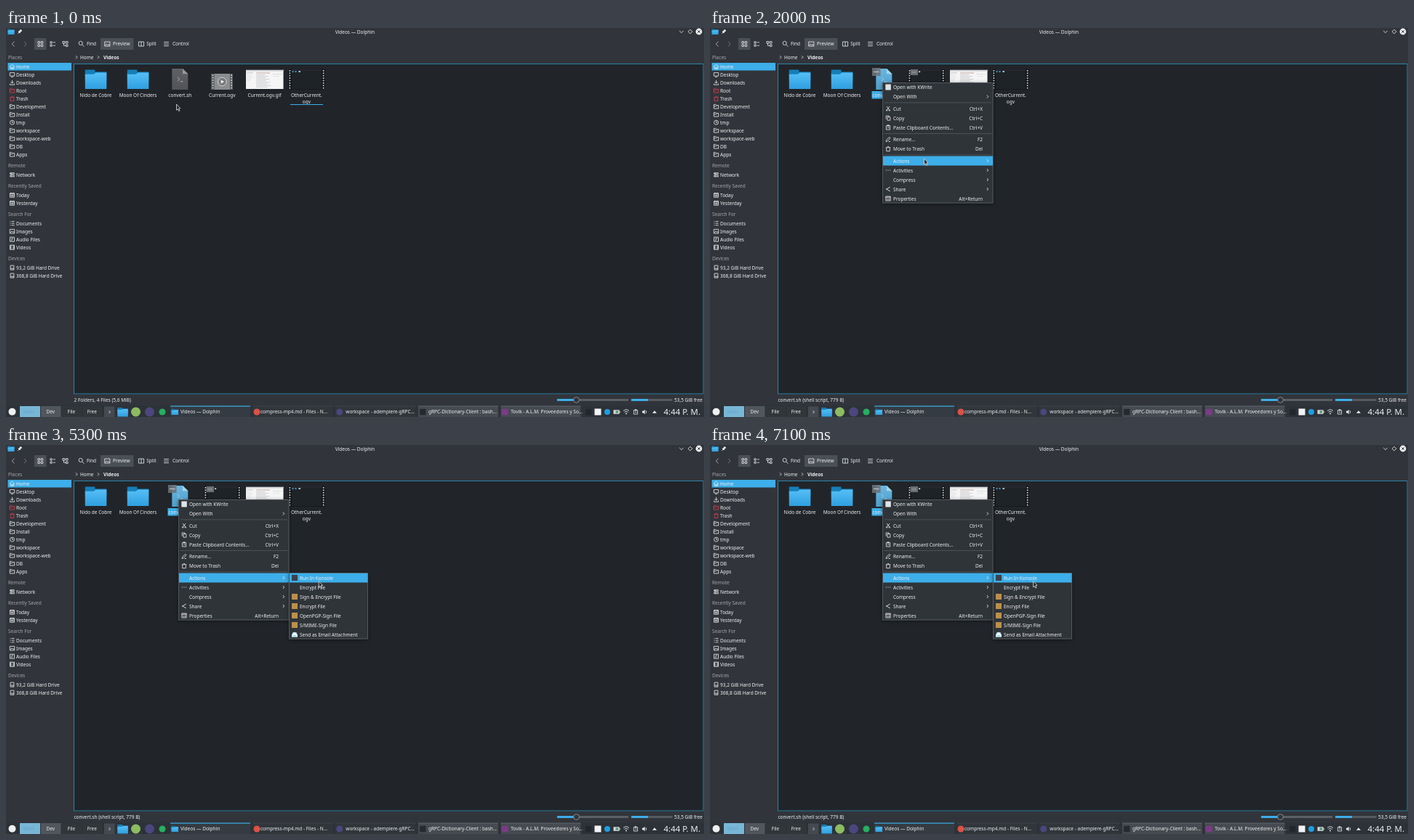
Write an HTML page with a canvas that moves like this. It is 960x536 px and loops after 8 s.

```html
<!DOCTYPE html>
<html lang="en">
<head>
<meta charset="utf-8">
<title>File manager</title>
<style>
html, body { margin: 0; width: 100%; height: 100%; overflow: hidden; background: #31363b; }
canvas { display: block; width: 960px; height: 536px; }
</style>
</head>
<body>
<canvas id="stage"></canvas>
<script>
const W = 960, H = 536, LOOP = 8000, STEP = 100;
const canvas = document.getElementById('stage');
const ctx = canvas.getContext('2d');
const dpr = window.devicePixelRatio || 1;
canvas.width = W * dpr;
canvas.height = H * dpr;

const PANEL = '#31353b', VIEW = '#212529', TEXT = '#eff0f1', DIM = '#a3a7ab', BLUE = '#3daee9', RED = '#da4453';

const ICONS = {
  folder: 'M-3.2 2.8V-2.8H-.6L.4-1.7H3.2V2.8ZM-3.2-.4H0L1-1.6',
  home: 'M-3.4 .2L0-3.2L3.4 .2M-2.4-.6V3H2.4V-.6M-.6 3V1H.8V3',
  desktop: 'M-3.2-2.6H3.2V1.8H-3.2ZM-1.6 3.2H1.6',
  download: 'M0-3.3V1M-2-1L0 1L2-1M-3 1.4V3H3V1.4',
  trash: 'M-2.3-1.8V3.2H2.3V-1.8M-3.2-1.8H3.2M-1-3H1',
  clock: 'M-3 0a3 3 0 1 0 6 0a3 3 0 1 0-6 0M0-2V.2H1.8',
  network: 'M-2.8-2.6H2.8V-.8H-2.8ZM-2.8 .8H2.8V2.6H-2.8ZM-2-1.6H0M-2 1.7H0',
  calendar: 'M-3-2.6H3V3H-3ZM-3-1.4H3M-1.8 .2H2M-1.8 1.6H2M-1.6-3.4V-2.6M1.6-3.4V-2.6',
  docs: 'M-3-2.6H-2M-.8-2.6H3M-3 0H-2M-.8 0H3M-3 2.6H-2M-.8 2.6H3',
  image: 'M-3.2-2.8H3.2V2.8H-3.2ZM-2.4 2L-.6-.4L.8 1.2L1.8 .2L2.8 2',
  audio: 'M-3-3H3V3H-3ZM-.4 1.6V-1.6L1.4-1M-1.6 1.6H-.4',
  video: 'M-3-3H3V3H-3ZM-1.6-3V3M1.6-3V3M-3 0H-1.6M1.6 0H3',
  drive: 'M-2.4-3H2.4V3H-2.4ZM-2.4 1H2.4M.6 2H1.4',
  left: 'M1.6-3.4L-1.8 0L1.6 3.4',
  right: 'M-1.5-3L1.5 0L-1.5 3',
  arrow: 'M-1-2L1 0L-1 2',
  down: 'M-2.8-1.2L0 1.6L2.8-1.2',
  diamond: 'M0-2.9L2.9 0L0 2.9L-2.9 0Z',
  cross: 'M-1.7-1.7L1.7 1.7M1.7-1.7L-1.7 1.7',
  grid: 'M-3.4-3.4H-.9V-.9H-3.4ZM.9-3.4H3.4V-.9H.9ZM-3.4 .9H-.9V3.4H-3.4ZM.9 .9H3.4V3.4H.9Z',
  list: 'M-3.4-3.2H-1V-1H-3.4ZM-3.4 1H-1V3.2H-3.4ZM.6-2.2H3.6M.6 2.2H3.6',
  tree: 'M-3.6-3.4H-.6V-1H-3.6ZM.8 1H3.6V3.4H.8ZM.8-3.4H3.6V-1H.8ZM-2-1V2.2H.8',
  find: 'M-3.4-.8a2.6 2.6 0 1 0 5.2 0a2.6 2.6 0 1 0-5.2 0M1.2 1.2L4 4',
  preview: 'M-3.6-3H3.6V3H-3.6ZM-3 2.4L-1-.2L.6 1.6L1.8 .4L3 2.4',
  split: 'M-3.6-3H3.6V3H-3.6ZM0-3V3',
  menu: 'M-3.4-2.6H3.4M-3.4 0H3.4M-3.4 2.6H3.4',
  cut: 'M-2-3L1.4 1.6M2-3L-1.4 1.6M-2.6 2.4a.8.8 0 1 0 1.6 0a.8.8 0 1 0-1.6 0M1 2.4a.8.8 0 1 0 1.6 0a.8.8 0 1 0-1.6 0',
  copy: 'M-2.8 1.6V-3H1V-1.6M-1-1.4H2.8V3.2H-1Z',
  paste: 'M-2.6-2.4H2.6V3H-2.6ZM-1-3.2H1V-2H-1ZM-1 .2H1.4',
  rename: 'M-3 3L-2.4 .8L1.6-3.2L3-1.8L-1 2.4ZM.6 3H3',
  dots: 'M-3.2 0H-2M-.6 0H.6M2 0H3.2',
  share: 'M-2.4 0L2-2.4M-2.4 0L2 2.4M-3 0H-1.8M1.4-2.6H2.6M1.4 2.6H2.6',
  props: 'M-3.2-3H3.2V3H-3.2ZM-3.2-1.8H3.2M-2 0H-.6M.4 0H2.2M-2 1.6H-.6M.4 1.6H2.2'
};
for (const name in ICONS) ICONS[name] = new Path2D(ICONS[name]);

const PLACES = [
  [53, 'Home', 'home'], [64, 'Desktop', 'desktop'], [75, 'Downloads', 'download'],
  [86, 'Root', 'folder', RED], [97, 'Trash', 'trash', RED], [108, 'Development', 'folder'],
  [119, 'Install', 'folder'], [130, 'tmp', 'clock'], [141, 'workspace', 'folder'],
  [152, 'workspace-web', 'folder'], [163, 'DB', 'folder'], [174, 'Apps', 'folder'],
  [202, 'Network', 'network'], [230, 'Today', 'calendar'], [241, 'Yesterday', 'calendar'],
  [269, 'Documents', 'docs'], [280, 'Images', 'image'], [291, 'Audio Files', 'audio'],
  [302, 'Videos', 'video'], [330, '93,2 GiB Hard Drive', 'drive'], [341, '368,8 GiB Hard Drive', 'drive']
];
const HEADINGS = [[40, 'Places'], [189, 'Remote'], [217, 'Recently Saved'], [256, 'Search For'], [317, 'Devices']];

// Label, centre line, icon, shortcut ('>' opens a submenu)
const MENU = [
  ['Open with KWrite', 81.5, 'square'], ['Open With', 94.5, '', '>'],
  ['Cut', 111, 'cut', 'Ctrl+X'], ['Copy', 124, 'copy', 'Ctrl+C'],
  ['Paste Clipboard Contents...', 137, 'paste', 'Ctrl+V'],
  ['Rename...', 153.5, 'rename', 'F2'], ['Move to Trash', 166.5, 'trash', 'Del'],
  ['Actions', 183, '', '>'], ['Activities', 196, 'dots', '>'], ['Compress', 209, '', '>'],
  ['Share', 222, 'share', '>'], ['Properties', 235, 'props', 'Alt+Return']
];
const ACTIONS = ['Run In Konsole', 'Encrypt File', 'Sign & Encrypt File', 'Encrypt File',
  'OpenPGP-Sign File', 'S/MIME-Sign File', 'Send as Email Attachment'];

// Pointer path: time, x, y
const PATH = [
  [0, 234.5, 105], [700, 238, 75.8], [1700, 238, 75.8], [2000, 294.6, 180],
  [2500, 305, 183], [3000, 305, 183], [3800, 430.6, 187], [5200, 430.6, 187],
  [5300, 430.2, 187.6], [6000, 430.2, 233.6], [6200, 431, 248], [6400, 432, 248],
  [7000, 443, 188.5], [7100, 444.6, 187.6]
];

function pointerAt(t) {
  const i = PATH.findIndex(p => p[0] > t);
  if (i < 0) return PATH[PATH.length - 1].slice(1);
  const a = PATH[i - 1], b = PATH[i];
  const k = (t - a[0]) / (b[0] - a[0]);
  return [a[1] + (b[1] - a[1]) * k, a[2] + (b[2] - a[2]) * k];
}

function rect(x, y, w, h, fill) {
  ctx.fillStyle = fill;
  ctx.fillRect(x, y, w, h);
}

function frame(x, y, w, h, color) {
  ctx.strokeStyle = color;
  ctx.lineWidth = 1;
  ctx.strokeRect(x + .5, y + .5, w - 1, h - 1);
}

function disc(x, y, r, fill, edge) {
  ctx.beginPath();
  ctx.arc(x, y, r, 0, Math.PI * 2);
  ctx.fillStyle = fill;
  ctx.fill();
  if (edge) {
    ctx.strokeStyle = edge;
    ctx.lineWidth = .8;
    ctx.stroke();
  }
}

function shape(d, x, y, fill, edge, width = .8) {
  ctx.save();
  ctx.translate(x, y);
  const path = typeof d === 'string' ? new Path2D(d) : d;
  if (fill) { ctx.fillStyle = fill; ctx.fill(path); }
  if (edge) { ctx.strokeStyle = edge; ctx.lineWidth = width; ctx.stroke(path); }
  ctx.restore();
}

const icon = (name, x, y, color = TEXT, width = .8) => shape(ICONS[name], x, y, null, color, width);

// y is the middle of the capitals; type is set at double size and halved
function text(str, x, y, { color = TEXT, align = 'left', size = 6.5, weight = 400 } = {}) {
  ctx.save();
  ctx.translate(x, y + size * .36);
  ctx.scale(.5, .5);
  ctx.font = `${weight} ${size * 2}px "Noto Sans", sans-serif`;
  ctx.textAlign = align;
  ctx.fillStyle = color;
  ctx.fillText(str, 0, 0);
  ctx.restore();
}

function folder(x, y, w, h) {
  const g = ctx.createLinearGradient(0, y, 0, y + h);
  g.addColorStop(0, '#5cc4fa');
  g.addColorStop(1, '#2f9fe0');
  rect(x, y, w * .46, h * .3, '#157fb9');
  rect(x, y + h * .11, w, h * .5, '#157fb9');
  ctx.beginPath();
  ctx.moveTo(x, y + h * .24);
  ctx.lineTo(x + w * .4, y + h * .24);
  ctx.lineTo(x + w * .5, y + h * .15);
  ctx.lineTo(x + w, y + h * .15);
  ctx.lineTo(x + w, y + h);
  ctx.lineTo(x, y + h);
  ctx.fillStyle = g;
  ctx.fill();
}

function filmThumb(x, marks) {
  rect(x, 57, 50, 27.5, '#0d0f11');
  rect(x + 4, 57.5, 42, 26.5, '#1e2328');
  rect(x + 4, 57.5, 42, 1, '#30353a');
  for (let y = 58; y < 84; y += 3.4) {
    rect(x + 1, y, 1.7, 1.8, '#d4d6d8');
    rect(x + 47.3, y, 1.7, 1.8, '#d4d6d8');
  }
  marks(x);
}

function videoIcon() {
  rect(282.5, 63, 29.5, 22, '#8b8d8f');
  rect(282.5, 63, 4, 22, '#55585b');
  rect(308, 63, 4, 22, '#55585b');
  for (let y = 64.2; y < 84; y += 3.5) {
    rect(283.6, y, 1.8, 1.7, '#d0d2d3');
    rect(309.2, y, 1.8, 1.7, '#d0d2d3');
  }
  disc(297.3, 74, 5.8, '#77797b', '#e6e7e8');
  shape('M-1.6-2.6L2.8 0L-1.6 2.6Z', 297.3, 74, '#f0f0f0');
}

function pageThumb() {
  rect(330, 57, 51.5, 27, '#f5f5f5');
  rect(330, 57, 51.5, 1.3, '#55585b');
  rect(330, 58.3, 51.5, 1.8, '#dcdfe2');
  rect(331, 61.5, 9, .8, '#b8bcc0');
  rect(344, 61.5, 19, 1, '#c3a7a3');
  for (let i = 0; i < 9; i++) {
    rect(344, 64 + i * 2.1, 12 + i * 5 % 9, .8, '#bfc3c7');
    if (i < 5) rect(331, 64 + i * 2.1, 5 + i * 3 % 4, .6, '#d5d8da');
  }
  rect(367, 63, 12, .7, '#cfd3d6');
  rect(367, 66, 9, .7, '#d8dbde');
}

function scriptIcon(hover, selected) {
  const g = ctx.createLinearGradient(0, 56, 0, 85);
  const [top, bottom] = selected ? ['#69b6df', '#4d9fcd'] : hover ? ['#777a7d', '#6a6c70'] : ['#5f6164', '#515357'];
  g.addColorStop(0, top);
  g.addColorStop(1, bottom);
  shape('M228.3 56H243L250.3 63.3V85H228.3Z', 0, 0, g);
  shape('M243 56L250.3 63.3H243Z', 0, 0, selected ? '#a4d5ee' : '#96989a');
  shape('M235-2.4', 0, 0);
  shape('M-3.5-2.7L-1 0L-3.5 2.7M.3 3.3H3.8', 239.5, 70.5, null, selected ? '#b9dff2' : '#c7c9cb', .8);
  if (hover) {
    rect(223, 55, 11.5, 11, 'rgba(110,116,122,.88)');
    rect(225, 60, 7.5, 1, '#c9ccce');
    if (!selected) rect(228.2, 56.8, 1, 7.5, '#c9ccce');
  }
}

function drawChrome() {
  rect(0, 0, W, H, PANEL);
  folder(2.5, 1.5, 9, 7.5);
  shape('M1-3L3-1L1.4-.4L0 2L-2 0L.4-1.4ZM-1 1L-3 3', 19, 5, TEXT, TEXT, .7);
  text('Videos — Dolphin', 479.8, 5.2, { align: 'center' });
  icon('down', 929, 5);
  icon('diamond', 941, 5);
  disc(953, 5, 4.4, TEXT);
  icon('cross', 953, 5, PANEL, 1);

  icon('left', 10, 22, '#a7abaf', 1);
  shape(ICONS.right, 26.5, 22, null, '#6d7277', 1);
  rect(39, 14, 16.5, 16, '#4b5056');
  icon('grid', 47.3, 22);
  icon('list', 64.3, 22);
  icon('tree', 81.5, 22);
  icon('find', 103.5, 21.7);
  text('Find', 111, 22);
  rect(130, 14, 45.5, 16, '#4b5056');
  icon('preview', 139.3, 22);
  text('Preview', 147, 22);
  icon('split', 186, 22);
  text('Split', 193.3, 22);
  icon('menu', 220.5, 22);
  text('Control', 229, 22);

  icon('arrow', 97, 40.3);
  text('Home', 102, 40.3);
  icon('arrow', 127, 40.3);
  text('Videos', 134, 40.3, { weight: 700 });

  rect(2.5, 48, 87.5, 10.5, BLUE);
  for (const [y, label] of HEADINGS) text(label, 3, y + .2, { color: DIM });
  for (const [y, label, name, color] of PLACES) {
    icon(name, 8.5, y + .2, color);
    text(label, 14, y + .2);
  }
}

function drawStatus(label) {
  text(label, 93.5, 512.5);
  rect(758, 511, 98, 3, '#5b6065');
  rect(758, 511, 26, 3, BLUE);
  disc(784.5, 512.5, 3.9, PANEL, '#9a9ea2');
  rect(860, 511, 56.5, 3, '#565b60');
  rect(860, 511, 23, 3, BLUE);
  text('53,5 GiB free', 958, 512.7, { align: 'right' });
}

function task(x, label, textX, fill, line) {
  rect(x, 521, 110, 15, fill);
  rect(x, 520.5, 110, 1.2, line);
  text(label, textX, 529);
}

function drawTaskbar() {
  rect(0, 520.5, W, 15.5, '#2d3238');
  disc(8.5, 528.7, 5, TEXT);
  rect(19, 521, 28, 15, '#78b6d6');
  text('Main', 31, 529, { color: '#63a5c8', align: 'center' });
  rect(48, 521, 27.5, 15, '#50565c');
  rect(76.5, 521, 27.5, 15, '#31363b');
  rect(105, 521, 27, 15, '#31363b');
  text('Dev', 61.3, 529, { align: 'center' });
  text('File', 90, 529, { align: 'center' });
  text('Free', 118.3, 529, { align: 'center' });
  rect(135, 521.5, 14.5, 14.5, '#444a50');
  icon('arrow', 142.5, 529);
  folder(153.3, 523, 14.5, 12.5);
  disc(178.5, 529, 6.5, '#8dbb62');
  disc(197.5, 529, 6.5, '#4b467f');
  disc(215, 529, 4.5, '#27ae60');

  task(226, 'Videos — Dolphin', 240, '#343b42', BLUE);
  folder(227.5, 525, 9.5, 8);
  task(339.5, 'compress-mp4.md - Files - N...', 350, '#31363b', '#3c4248');
  disc(345, 529, 4.5, '#dd5144');
  task(453, 'workspace - adempiere-gRPC...', 467.3, '#31363b', '#3c4248');
  disc(458.7, 529, 4.5, '#4b467f');
  task(567, 'gRPC-Dictionary-Client : bash...', 581, '#464b51', '#5b6066');
  rect(569, 524.8, 8.5, 8.5, '#252a2f');
  task(680.5, 'Tovik - A.L.M. Proveedores y So...', 694.2, '#464b51', '#5b6066');
  rect(682, 524.8, 8.5, 8.5, '#7a3b86');

  rect(797, 525, 8.5, 8.5, '#22272b');
  rect(809.5, 524.5, 9, 9, '#f2f3f4');
  disc(827, 529, 4, '#1c9fe0');
  rect(835.5, 526.3, 8, 5.5, '#d9dbdd');
  rect(843.5, 527.8, 1.2, 2.5, '#d9dbdd');
  rect(838.5, 527.4, 3.5, 3.2, '#4c9b62');
  shape('M-4-1.5Q0-5 4-1.5M-2.6 .4Q0-2 2.6 .4M-1 2.4L0 3.2L1 2.4L0 1.6Z', 853, 529, null, TEXT);
  icon('paste', 866, 529);
  shape('M-3-1.3H-1.4L.6-3.2V3.2L-1.4 1.3H-3Z', 878, 529, TEXT);
  shape('M2-2Q3.6 0 2 2', 878, 529, null, TEXT);
  shape('M-3 1.8L0-1.8L3 1.8Z', 892, 529, TEXT);
  text('4:44 P. M.', 955, 529, { size: 11.4, align: 'right' });
}

function drawFiles({ hover, selected, thumb }) {
  rect(93, 49, 867, 456, VIEW);
  frame(93, 49, 866.5, 455.5, '#3182aa');
  folder(108.8, 57.5, 29.5, 26.5);
  folder(166.8, 57.5, 29.5, 26.5);
  scriptIcon(hover, selected);
  if (thumb) {
    filmThumb(272.5, x => {
      rect(x + 3, 57, 10.5, 8, '#6a6f74');
      rect(x + 5, 60.5, 6, .9, '#a9adb0');
      rect(x + 14.5, 59.5, 2.2, 1.6, '#dfe1e3');
    });
  } else videoIcon();
  pageThumb();
  filmThumb(388.5, x => {
    rect(x + 5, 59.3, 2, 1.6, BLUE);
    rect(x + 9, 59.3, 2, 1.6, BLUE);
    rect(x + 14, 59.3, 2.5, 1.6, '#dfe1e3');
  });

  const center = { align: 'center' };
  if (selected) rect(222.5, 87, 34, 10.5, BLUE);
  text('Nido de Cobre', 123.5, 92.3, center);
  text('Moon Of Cinders', 181.5, 92.3, center);
  text('convert.sh', 239.3, 92.3, center);
  text('Current.ogv', 297.3, 92.3, center);
  text('Current.ogv.gif', 355.5, 92.3, center);
  text('OtherCurrent.', 413.4, 92.3, center);
  text('ogv', 413.4, 101.3, center);
  if (!selected) rect(391, 105, 45, 1, BLUE);
}

function panel(x, y, w, h) {
  ctx.save();
  ctx.shadowColor = 'rgba(0,0,0,.45)';
  ctx.shadowBlur = 5 * dpr;
  ctx.shadowOffsetY = dpr;
  rect(x, y, w, h, '#2f3439');
  ctx.restore();
  frame(x, y, w, h, '#53585d');
}

function drawMenu(active) {
  panel(237, 75, 152.5, 166.5);
  for (const y of [102.8, 145.3, 174.8]) rect(240, y - .3, 147, .8, '#555a5f');
  for (const [label, y, name, key] of MENU) {
    if (label === active) rect(238, y - 6.5, 151, 13, BLUE);
    if (name === 'square') rect(241.3, y - 4, 7.5, 8, '#dfe3e6');
    else if (name) icon(name, 245, y);
    text(label, 252, y + .2);
    if (key === '>') icon('arrow', 381.8, y);
    else if (key) text(key, 375, y + .2, { align: 'right' });
  }
}

function drawSubmenu(active) {
  panel(389, 176, 109, 91.5);
  ACTIONS.forEach((label, i) => {
    const y = 183 + i * 13;
    if (i === active) rect(390, y - 6.3, 107.5, 12.8, BLUE);
    if (i === 0) {
      rect(393, y - 4, 8, 8, '#3b4147');
    } else if (i === 6) {
      shape('M-4-.6L0-3.8L4-.6V3.6H-4Z', 397, y, BLUE);
      rect(394.3, y - 2.6, 5.4, 3.6, '#ffffff');
      shape('M-4-.2L0 2L4-.2V3.6H-4Z', 397, y, '#d8eefa');
    } else if (i > 1) {
      rect(393, y - 4, 8, 8, '#bd8f4b');
    }
    text(label, 404, y + .2);
  });
}

function drawPointer(x, y) {
  shape('M0 0V8.2L1.8 6.7L3.1 9.5L4.4 8.9L3.2 6.1L5.3 5.7Z', x, y, '#24282c', '#dfe1e3', .8);
}

function draw(t) {
  const [x, y] = pointerAt(t);
  const hover = y < 98 || t > 700;
  ctx.setTransform(dpr, 0, 0, dpr, 0, 0);
  drawChrome();
  drawFiles({ hover, selected: t >= 1100, thumb: t >= 500 });
  drawStatus(hover ? 'convert.sh (shell script, 779 B)' : '2 Folders, 4 Files (5,6 MiB)');
  drawTaskbar();

  const submenu = t >= 2300;
  if (t >= 1700) {
    const row = MENU.find(m => Math.abs(m[1] - y) <= 6.5);
    drawMenu(submenu ? 'Actions' : t > 1700 && row ? row[0] : '');
  }
  if (submenu) drawSubmenu(x > 389 ? Math.floor((y - 176.5) / 13) : -1);
  drawPointer(x, y);
}

const start = performance.now();
function tick() {
  const t = (performance.now() - start) % LOOP;
  draw(Math.floor(t / STEP) * STEP);
  requestAnimationFrame(tick);
}
tick();
</script>
</body>
</html>
```
